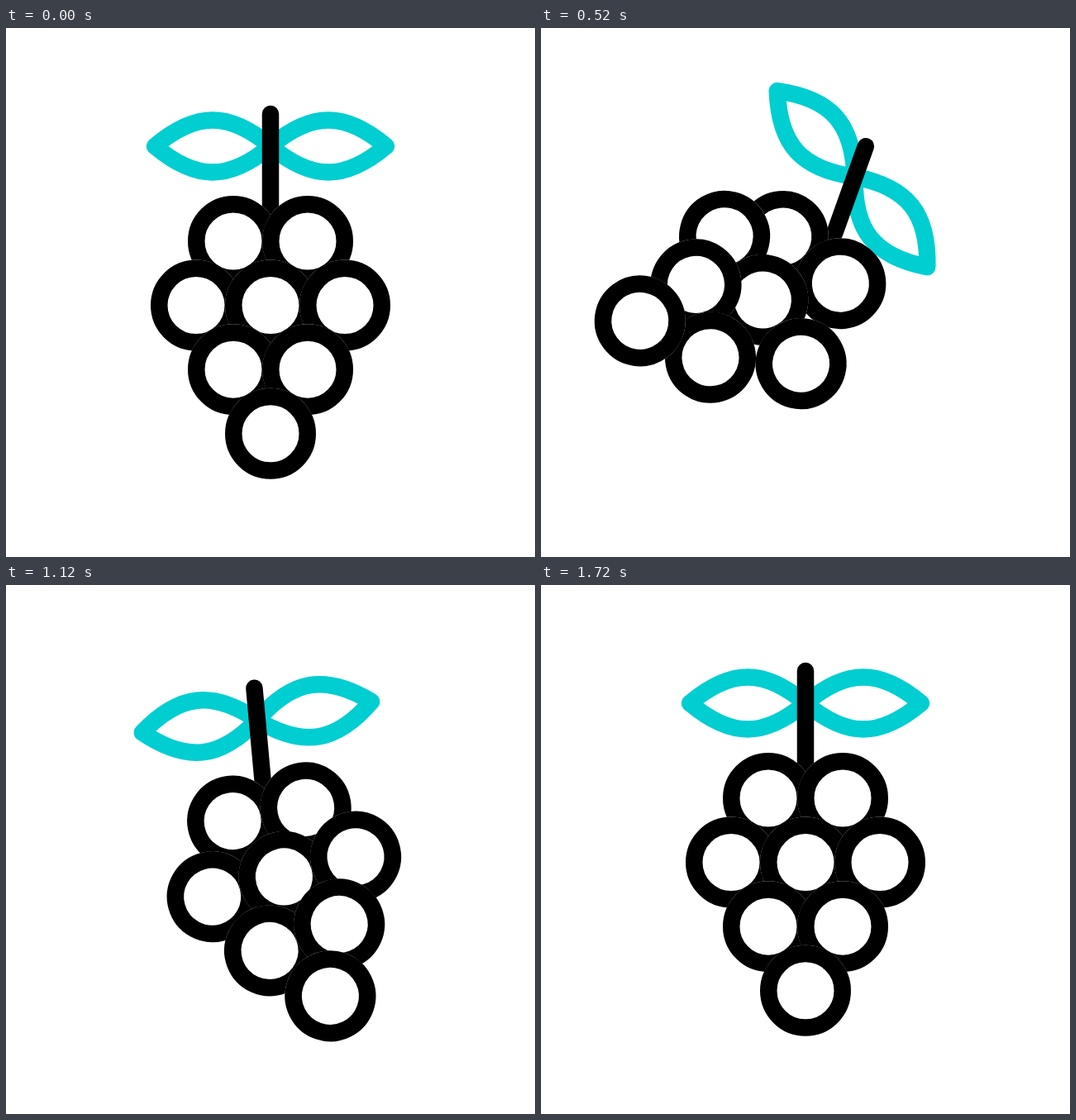
Recreate the animation shown at these times as an HTML page with a canvas. Size 640 by 640 pixels, loop 2 s.

```html
<!DOCTYPE html>
<html lang="en">
<head>
<meta charset="utf-8">
<title>Swinging grapes</title>
<style>
  html, body { margin: 0; width: 100%; height: 100%; overflow: hidden; background: #fff; }
  canvas { display: block; width: 100%; height: 100%; }
</style>
</head>
<body>
<canvas id="stage" width="640" height="640"></canvas>
<script>
const ctx = document.getElementById('stage').getContext('2d');
const LOOP = 2000, STEP = 40;
const CENTER = 320, STROKE = 20.5, BERRY = 44.75;
const LEAF_Y = 143, LEAF_LENGTH = 140;
const ROWS = [2, 3, 2, 1], FIRST_ROW_Y = 258, ROW_GAP = 77.6, BERRY_GAP = 90;

// Keys are [ms, value, softness]; softness 1 is a full cosine ease, 0 is linear.
const tracks = {
  swing: [[0, 0], [440, 21.5], [985, -13], [1289, 5.9], [1720, 0]],
  drop: [[0, 0], [333, 50], [850, -31], [1230, 36, 0.5], [1490, -7], [1720, 0]],
  leafSwing: [[0, 0], [443, 33], [955, -24.3], [1290, 20.3], [1720, 0]],
  leafLift: [[0, 0], [200, 4.3], [780, -6], [1180, 2], [1370, -3], [1720, 0]],
};

function valueAt(keys, time) {
  const next = keys.findIndex(key => key[0] > time);
  if (next < 0) return keys[keys.length - 1][1];
  const [t0, v0] = keys[next - 1];
  const [t1, v1, softness = 1] = keys[next];
  const x = (time - t0) / (t1 - t0);
  const eased = (1 - Math.cos(Math.PI * x)) / 2;
  return v0 + (v1 - v0) * (x + (eased - x) * softness);
}

function rotateAbout(y, degrees) {
  ctx.translate(CENTER, y);
  ctx.rotate(degrees * Math.PI / 180);
  ctx.translate(-CENTER, -y);
}

function drawLeaf(side, degrees) {
  ctx.save();
  rotateAbout(LEAF_Y, degrees);
  ctx.translate(CENTER, LEAF_Y);
  ctx.scale(side, 1);
  ctx.beginPath();
  ctx.moveTo(0, 0);
  ctx.bezierCurveTo(50, -42, 90, -42, LEAF_LENGTH, 0);
  ctx.bezierCurveTo(90, 42, 50, 42, 0, 0);
  ctx.closePath();
  ctx.strokeStyle = '#00ced1';
  ctx.stroke();
  ctx.restore();
}

function drawStem() {
  ctx.beginPath();
  ctx.moveTo(CENTER, 104);
  ctx.lineTo(CENTER, 216);
  ctx.strokeStyle = '#000';
  ctx.stroke();
}

function drawBerry(x, y) {
  ctx.beginPath();
  ctx.arc(x, y, BERRY + STROKE / 2, 0, 2 * Math.PI);
  ctx.fillStyle = '#fff';
  ctx.fill();
  ctx.beginPath();
  ctx.arc(x, y, BERRY, 0, 2 * Math.PI);
  ctx.strokeStyle = '#000';
  ctx.stroke();
}

function draw(time) {
  const swing = valueAt(tracks.swing, time);
  const leafSwing = valueAt(tracks.leafSwing, time);
  const leafLift = valueAt(tracks.leafLift, time);

  ctx.setTransform(1, 0, 0, 1, 0, 0);
  ctx.fillStyle = '#fff';
  ctx.fillRect(0, 0, 640, 640);
  ctx.lineWidth = STROKE;
  ctx.lineCap = ctx.lineJoin = 'round';

  ctx.translate(0, valueAt(tracks.drop, time));
  rotateAbout(CENTER, swing);
  drawLeaf(-1, leafSwing + leafLift);
  drawLeaf(1, leafSwing - leafLift);
  drawStem();

  // Each row hangs from the one above, so the bend adds up down the bunch.
  ROWS.forEach((count, row) => {
    const y = FIRST_ROW_Y + row * ROW_GAP;
    rotateAbout(y - BERRY, swing);
    for (let i = 0; i < count; i++) {
      drawBerry(CENTER + (i - (count - 1) / 2) * BERRY_GAP, y);
    }
  });
}

const start = performance.now();
function frame() {
  const time = (performance.now() - start) % LOOP;
  draw(Math.floor(time / STEP) * STEP);
  requestAnimationFrame(frame);
}
frame();
</script>
</body>
</html>
```
